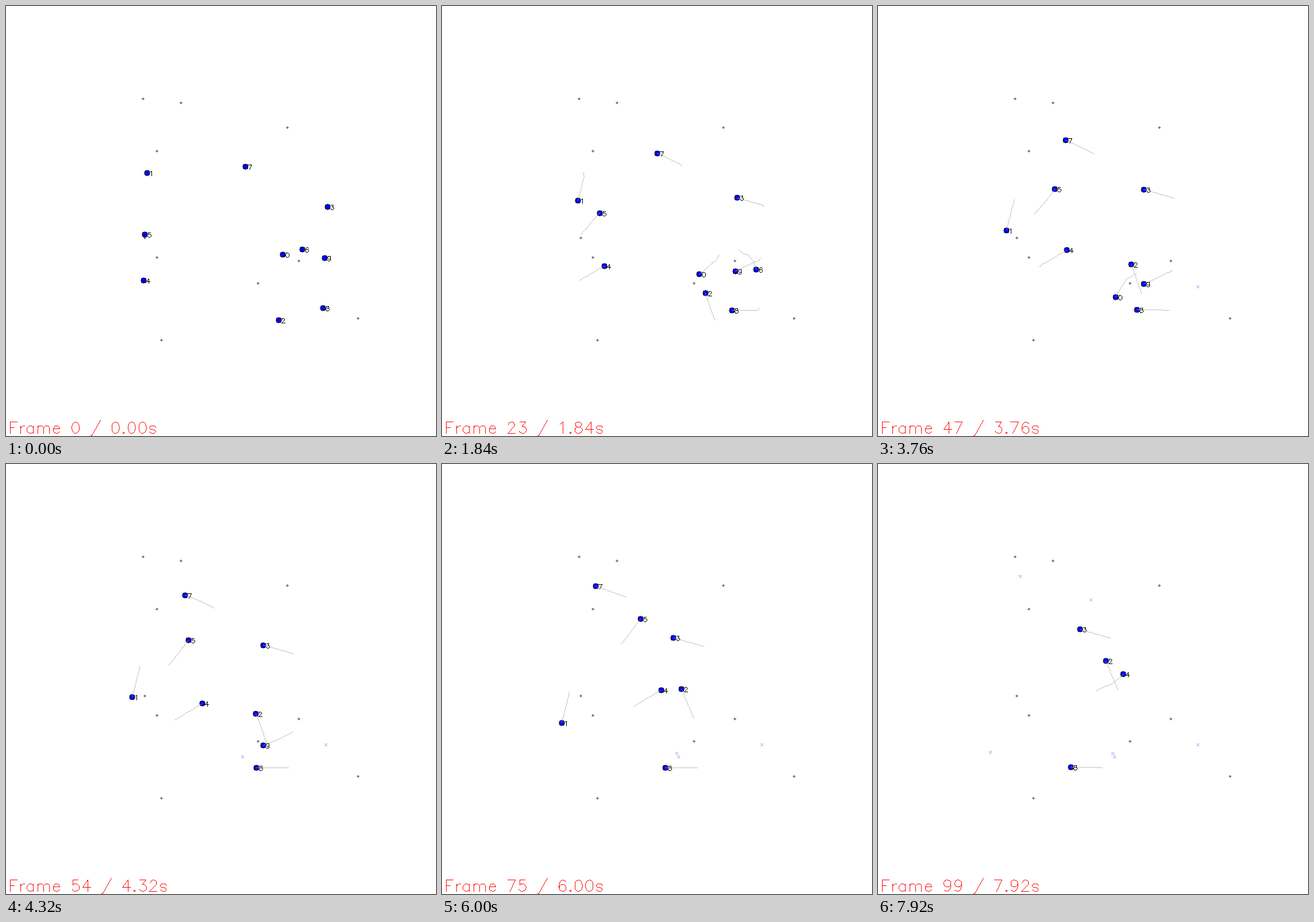
Animation, 748 px wide and 748 px high, one loop 8 s. Source, as a matplotlib script:

```python
import matplotlib.pyplot as plt
import numpy as np
from matplotlib.animation import FuncAnimation

SIZE, DPI = 748, 100
FRAMES, INTERVAL = 100, 80
SPEED, LAG, TRAIL = 2.225, 0.7, 25

WHITE, BLACK, RED, BLUE = (255,) * 3, (0,) * 3, (255, 0, 0), (0, 0, 255)
GRAY, TRAIL_GRAY, GOAL_BLUE = (128,) * 3, (165,) * 3, (140, 140, 245)

OBSTACLES = [(238, 161), (304, 168), (489, 211), (262, 252), (241, 403),
             (262, 437), (509, 443), (438, 482), (612, 543), (270, 581)]

# Start, turning points and goal of each agent.
ROUTES = [
    [(481, 432), (478, 440), (449, 465), (431, 475), (411, 509)],
    [(245, 290), (247, 295), (195, 501)],
    [(474, 546), (440, 448), (394, 338)],
    [(559, 349), (558, 346), (346, 286)],
    [(239, 477), (382, 392), (408, 381), (428, 364)],
    [(241, 397), (294, 336), (370, 236)],
    [(515, 423), (524, 431), (533, 433), (542, 445), (556, 488)],
    [(416, 279), (415, 275), (326, 233), (243, 204), (247, 195)],
    [(551, 525), (549, 529), (331, 527)],
    [(554, 438), (552, 441), (463, 483), (408, 503)],
]


class Agent:
    """Walks its route at the common speed after a short start-up lag."""

    def __init__(self, route):
        self.route = np.array(route, float)
        steps = np.hypot(*np.diff(self.route, axis=0).T)
        self.reach = np.concatenate([[0], np.cumsum(steps)])

    def arrived(self, n):
        return walked(n) >= self.reach[-1]

    def at(self, n):
        axes = [np.interp(walked(n), self.reach, c) for c in self.route.T]
        return np.rint(np.stack(axes, axis=-1)).astype(int)


def walked(n):
    return SPEED * (n - LAG * (1 - np.exp(-n / LAG)))


def arc(cx, cy, rx, ry, start=0, stop=360):
    count = int(abs(stop - start) / 22.5) + 2
    a = np.radians(np.linspace(start, stop, count))
    return list(zip(cx + rx * np.cos(a), cy + ry * np.sin(a)))


def stem(x, height):
    return [(x, 0), (x, height)]


def arch(x):
    return arc(x + 5.5, 9, 5.5, 5, 180, 0) + [(x + 11, 0)]


# Single-stroke letters: advance width, then strokes with y up from baseline.
GLYPHS = {
    " ": (16, []),
    "/": (22, [[(20, 25), (2, -7)]]),
    ".": (10, [arc(5, 1, 1, 1)]),
    "F": (19, [stem(4, 21), [(4, 21), (17, 21)], [(4, 11), (12, 11)]]),
    "r": (13, [stem(4, 14), arc(11, 8, 7, 6, 180, 80)]),
    "a": (19, [stem(15, 14), arc(9.5, 7, 6.5, 7, 35, 325)]),
    "m": (30, [stem(4, 14), arch(4), arch(15)]),
    "e": (18, [[(3, 8)] + arc(9, 7, 6, 7, 10, 325)]),
    "s": (17, [arc(8.5, 10.5, 5.5, 3.5, 10, 270)
               + arc(8.5, 3.5, 5.5, 3.5, 90, -170)]),
    "0": (20, [arc(10, 10.5, 7, 10.5)]),
    "1": (20, [stem(11, 21) + [(6, 17)]]),
    "2": (20, [arc(10, 15.5, 6, 5.5, 180, -30) + [(3, 0), (17, 0)]]),
    "3": (20, [[(5, 21), (16, 21), (10, 13)]
               + arc(10.5, 6.5, 6.5, 6.5, 70, -155)]),
    "4": (20, [stem(13, 21) + [(3, 7), (18, 7)]]),
    "5": (20, [[(15, 21), (5, 21)] + arc(10, 7, 7, 7, 135, -155)]),
    "6": (20, [arc(11.5, 10.5, 7.5, 10.5, 50, 180)
               + arc(10.5, 6.5, 6.5, 6.5, 180, 540)]),
    "7": (20, [[(3, 21), (17, 21), (7, 0)]]),
    "8": (20, [arc(10, 16.5, 6, 4.5), arc(10, 6, 7, 6)]),
    "9": (20, [arc(9.5, 14.5, 6.5, 6.5)
               + arc(8.5, 10.5, 7.5, 10.5, 0, -130)]),
}


def paint(canvas, pixels, color, alpha=1):
    x, y = np.clip(np.asarray(pixels), 0, SIZE - 1).T
    canvas[y, x] = alpha * np.array(color) + (1 - alpha) * canvas[y, x]


def polyline(points):
    """Pixels of a one-pixel-wide line through the points."""
    points = np.rint(points).astype(int)
    runs = []
    for a, b in zip(points[:-1], points[1:]):
        count = np.abs(b - a).max() + 1
        runs.append(np.rint(np.linspace(a, b, count)).astype(int))
    return np.concatenate(runs)


def ring(radius):
    """Integer circle outline, stepped through one octant and mirrored."""
    dx, dy, err, plus, minus = radius, 0, 0, 1, 2 * radius - 1
    pixels = set()
    while dx >= dy:
        for x, y in ((dx, dy), (dy, dx)):
            pixels |= {(x, y), (-x, y), (x, -y), (-x, -y)}
        dy += 1
        err += plus
        plus += 2
        if err > 0:
            err -= minus
            dx -= 1
            minus -= 2
    return np.array(sorted(pixels))


def disc(radius):
    return np.array([(i, y) for x, y in ring(radius)
                     for i in range(-abs(x), abs(x) + 1)])


def write(canvas, text, x, y, scale, color):
    for char in text:
        advance, strokes = GLYPHS[char]
        for stroke in strokes:
            points = [x, y] + np.array(stroke) * [scale, -scale]
            paint(canvas, polyline(points), color)
        x += advance * scale


agents = [Agent(route) for route in ROUTES]
DOT, OUTLINE, SPECK = disc(5), ring(5), disc(2)
CROSS = np.array([(i, s * i) for i in range(-2, 3) for s in (1, -1)])

background = np.full((SIZE, SIZE, 3), WHITE, np.uint8)
for spot in OBSTACLES:
    paint(background, SPECK + spot, GRAY)

fig = plt.figure(figsize=(SIZE / DPI, SIZE / DPI), dpi=DPI, facecolor="white")
ax = fig.add_axes([0, 0, 1, 1])
ax.axis("off")
stage = ax.imshow(background, aspect="auto", interpolation="nearest")


def draw(n):
    canvas = background.copy()
    for i, agent in enumerate(agents):
        if agent.arrived(n):
            goal = agent.route[-1].astype(int)
            paint(canvas, CROSS + goal, GOAL_BLUE)
            continue
        here = agent.at(n)
        paint(canvas, DOT + here, BLUE)
        paint(canvas, OUTLINE + here, BLACK)
        if n:
            past = agent.at(np.arange(max(0, n - TRAIL), n + 1))
            paint(canvas, polyline(past), TRAIL_GRAY, alpha=0.7)
        write(canvas, str(i), *(here + [4, 5]), 0.4, BLACK)
    clock = f"Frame {n} / {n * INTERVAL / 1000:.2f}s"
    write(canvas, clock, 3, 743, 0.94, RED)
    stage.set_data(canvas)
    return [stage]


anim = FuncAnimation(fig, draw, frames=FRAMES, interval=INTERVAL,
                     repeat=True, repeat_delay=0, blit=False)
plt.show()
```
